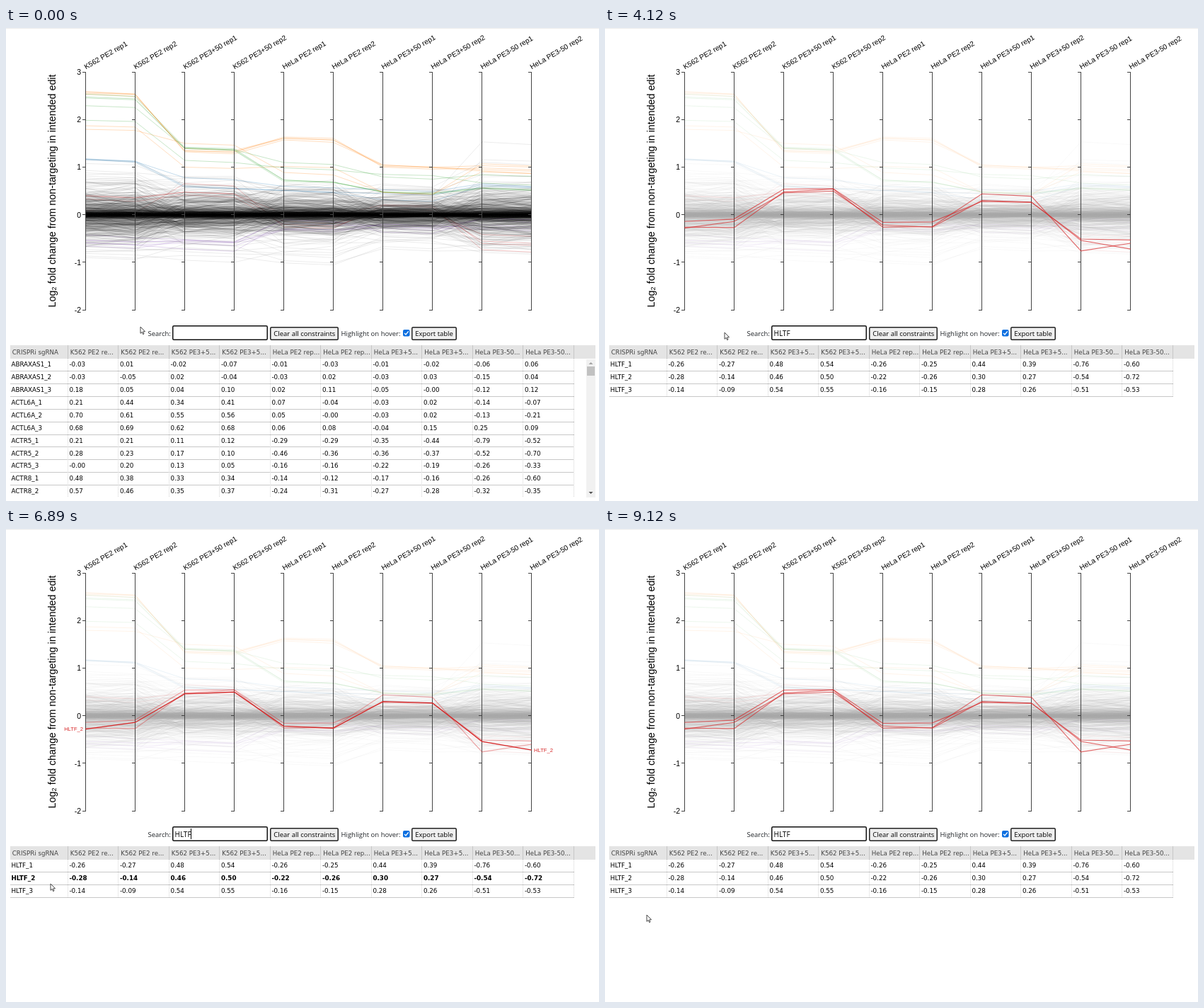
An HTML page with a canvas that plays this animation: 838x668 px, repeating every 9.26 s.

```html
<!DOCTYPE html>
<html lang="en">
<head>
<meta charset="utf-8">
<title>Parallel coordinates search</title>
<style>
html, body { margin: 0; width: 100%; height: 100%; overflow: hidden; background: #fff; }
canvas { display: block; }
</style>
</head>
<body>
<canvas id="stage" width="838" height="668"></canvas>
<script>
const W = 838, H = 668, LOOP = 9260;
const ctx = document.getElementById('stage').getContext('2d');
const SANS = '"Liberation Sans", Arial, sans-serif';
const UI = '"Open Sans", "Noto Sans", sans-serif';
const GRID = '"DejaVu Sans", Verdana, sans-serif';

const axisNames = ['K562 PE2', 'K562 PE3+50', 'HeLa PE2', 'HeLa PE3+50', 'HeLa PE3-50']
  .flatMap(name => [name + ' rep1', name + ' rep2']);
const headers = ['CRISPRi sgRNA', ...axisNames.map(name =>
  name.slice(0, name.startsWith('HeLa') ? (name.includes('+') ? 10 : 12) : (name.includes('+') ? 10 : 11))
    .replace(/(HeLa PE3-50).*/, '$1') + '...')];

// The words shown in the two states of the table.
const parseRows = block => block.trim().split('\n').map(line => line.trim().split(/\s+/));
const allRows = parseRows(`
  ABRAXAS1_1 -0.03 0.01 -0.02 -0.07 -0.01 -0.03 -0.01 -0.02 -0.06 0.06
  ABRAXAS1_2 -0.03 -0.05 0.02 -0.04 -0.03 0.02 -0.03 0.03 -0.15 0.04
  ABRAXAS1_3 0.18 0.05 0.04 0.10 0.02 0.11 -0.05 -0.00 -0.12 0.12
  ACTL6A_1 0.21 0.44 0.34 0.41 0.07 -0.04 -0.03 0.02 -0.14 -0.07
  ACTL6A_2 0.70 0.61 0.55 0.56 0.05 -0.00 -0.03 0.02 -0.13 -0.21
  ACTL6A_3 0.68 0.69 0.62 0.68 0.06 0.08 -0.04 0.15 0.25 0.09
  ACTR5_1 0.21 0.21 0.11 0.12 -0.29 -0.29 -0.35 -0.44 -0.79 -0.52
  ACTR5_2 0.28 0.23 0.17 0.10 -0.46 -0.36 -0.36 -0.37 -0.52 -0.70
  ACTR5_3 -0.00 0.20 0.13 0.05 -0.16 -0.16 -0.22 -0.19 -0.26 -0.33
  ACTR8_1 0.48 0.38 0.33 0.34 -0.14 -0.12 -0.17 -0.16 -0.26 -0.60
  ACTR8_2 0.57 0.46 0.35 0.37 -0.24 -0.31 -0.27 -0.28 -0.32 -0.35`);
const foundRows = parseRows(`
  HLTF_1 -0.26 -0.27 0.48 0.54 -0.26 -0.25 0.44 0.39 -0.76 -0.60
  HLTF_2 -0.28 -0.14 0.46 0.50 -0.22 -0.26 0.30 0.27 -0.54 -0.72
  HLTF_3 -0.14 -0.09 0.54 0.55 -0.16 -0.15 0.28 0.26 -0.51 -0.53`);

let seed = 20417;
const rand = () => {
  seed = (Math.imul(seed, 1664525) + 1013904223) >>> 0;
  return (seed + .5) / 4294967296;
};
const gauss = () => Math.sqrt(-2 * Math.log(rand())) * Math.cos(2 * Math.PI * rand());

const BLACK = '#000', RED = '#d62728';
const lines = [];

// Outlying lines: one key level per condition, both replicates scattered around it.
function addGroup(color, count, jitter, ...levels) {
  for (let i = 0; i < count; i++) {
    const values = levels.flatMap(level => {
      const v = level + jitter * gauss();
      return [v + .02, v - .02 + .01 * gauss()];
    });
    lines.push({ color, values });
  }
}
addGroup('#ff7f0e', 4, .04, 2.54, 1.33, 1.57, .98, .95);
addGroup('#ff7f0e', 2, .2, 2, 1.1, 1.13, .72, .85);
addGroup('#2ca02c', 3, .03, 2.46, 1.38, .7, .42, .58);
addGroup('#2ca02c', 2, .15, 2.1, 1.33, 1.1, .75, .8);
addGroup('#1f77b4', 3, .07, 1.16, .68, .52, .38, .6);
addGroup('#9467bd', 6, .09, -.6, -.6, -.25, -.2, -.2);
addGroup(RED, 4, .14, .25, .5, -.15, .2, -.6);
addGroup(BLACK, 3, .15, 1.1, .5, .4, .38, 1.2);
addGroup(BLACK, 5, .1, -.85, -.82, -.88, -.6, -.75);

// The bulk: a quarter are near-zero controls, the rest vary widely in effect size.
const spread = [.31, .24, .22, .165, .26];
for (let i = 0; i < 850; i++) {
  const size = rand() < .25 ? .12 : 1.5 * rand() ** 1.3;
  const shared = gauss();
  const values = spread.flatMap(s => {
    const base = .6 * shared + .8 * gauss();
    return [0, 1].map(() => {
      const v = s * size * (base + .3 * gauss());
      return .95 * Math.tanh((v > 0 ? 1.15 * v : v) / .95);
    });
  });
  lines.push({ color: BLACK, values });
}

const axisX = i => 112.4 + 70.03 * i;
const valueY = v => 263.8 - 67.1 * v;

function polyline(c, values, color, alpha, width) {
  c.strokeStyle = color;
  c.globalAlpha = alpha;
  c.lineWidth = width;
  c.beginPath();
  values.forEach((v, i) => c.lineTo(axisX(i), valueY(v)));
  c.stroke();
  c.globalAlpha = 1;
}

function makeLayer(gray, grayAlpha, colorAlpha) {
  const layer = document.createElement('canvas');
  layer.width = W;
  layer.height = H;
  const c = layer.getContext('2d');
  for (const { color, values } of lines)
    color === BLACK ? polyline(c, values, gray, grayAlpha, .8)
                    : polyline(c, values, color, colorAlpha, .8);
  return layer;
}
const fullLayer = makeLayer(BLACK, .1, .33);
const paleLayer = makeLayer('#d6d6d6', .27, .1);

function text(str, x, y, font, color = BLACK, align = 'left') {
  ctx.font = font;
  ctx.fillStyle = color;
  ctx.textAlign = align;
  ctx.fillText(str, x, y);
}
function rotatedText(str, x, y, degrees, font, align) {
  ctx.save();
  ctx.translate(x, y);
  ctx.rotate(degrees * Math.PI / 180);
  text(str, 0, 0, font, BLACK, align);
  ctx.restore();
}
function rect(x, y, w, h, fill) {
  ctx.fillStyle = fill;
  ctx.fillRect(x, y, w, h);
}
function shape(points, fill) {
  ctx.beginPath();
  points.forEach(([x, y]) => ctx.lineTo(x, y));
  ctx.closePath();
  ctx.fillStyle = fill;
  ctx.fill();
}

function drawAxes() {
  axisNames.forEach((name, i) => {
    const x = Math.floor(axisX(i));
    rect(x, 62, 1, 336, '#444');
    for (let v = -2; v <= 3; v++) rect(x - 4, Math.round(valueY(v) - .5), 5, 1, '#444');
    rotatedText(name, x + 1, 58.5, -30, '10.1px ' + SANS);
  });
  for (let v = -2; v <= 3; v++) text(v, 106, valueY(v) + 3.7, '10.5px ' + SANS, BLACK, 'right');
  rotatedText('Log₂ fold change from non-targeting in intended edit', 70, 230, -90, '14.3px ' + SANS, 'center');
}

function box(x, y, w, h, fill, border) {
  ctx.beginPath();
  ctx.roundRect(x + .75, y + .75, w - 1.5, h - 1.5, 1.5);
  ctx.fillStyle = fill;
  ctx.fill();
  ctx.strokeStyle = border;
  ctx.lineWidth = 1.5;
  ctx.stroke();
}

function drawControls(typed, caretOn) {
  const font = '9.5px ' + UI, ink = '#212529';
  text('Search:', 200.5, 435, font, ink);
  box(235, 420, 135, 21, '#fff', '#111');
  text(typed, 238.5, 435, '10px ' + UI);
  if (caretOn) rect(Math.round(238 + ctx.measureText(typed).width), 423, 1, 15, BLACK);
  box(373, 422, 97, 19, '#efefef', '#222');
  text('Clear all constraints', 421.8, 435, font, BLACK, 'center');
  text('Highlight on hover:', 473.5, 435, font, ink);
  ctx.beginPath();
  ctx.roundRect(561, 426, 9.5, 9.5, 2);
  ctx.fillStyle = '#0b6fe0';
  ctx.fill();
  ctx.strokeStyle = '#fff';
  ctx.lineWidth = 1.3;
  ctx.beginPath();
  ctx.moveTo(563, 431);
  ctx.lineTo(565, 433);
  ctx.lineTo(568.7, 428.3);
  ctx.stroke();
  box(573, 422, 64, 19, '#efefef', '#222');
  text('Export table', 605, 435, font, BLACK, 'center');
}

const ROW = 17.9;
const columnX = i => i ? 88 + 71.5 * (i - 1) : 6;

function drawTable(rows, hovered) {
  rect(6, 448, 827, 19, '#e4e4e4');
  headers.forEach((name, i) => {
    text(name, columnX(i) + 2.8, 461, '8.7px ' + GRID, '#444');
    rect(Math.floor(columnX(i + 1)) - 1, 448, 1, 19, '#c6c6c6');
  });
  rows.forEach((row, r) => {
    const weight = r === hovered ? 'bold ' : '';
    row.forEach((cell, i) =>
      text(cell, columnX(i) + 1.4, 478.2 + ROW * r, weight + '8.75px ' + GRID));
    const bottom = Math.round(484 + ROW * r);
    if (bottom < 660) rect(6, bottom, 797, 1, '#c8c8c8');
  });
  ctx.strokeStyle = '#d4d4d4';
  ctx.lineWidth = 1;
  ctx.setLineDash([1, 1]);
  for (let i = 1; i <= 11; i++) {
    const x = Math.floor(columnX(i)) - .5;
    ctx.beginPath();
    ctx.moveTo(x, 467);
    ctx.lineTo(x, Math.min(663, 484 + ROW * (rows.length - 1)));
    ctx.stroke();
  }
  ctx.setLineDash([]);
}

function drawScrollbar() {
  rect(820, 468, 13, 195, '#f1f1f1');
  rect(821, 478, 11, 13, '#c1c1c1');
  shape([[823.5, 475], [829.5, 475], [826.5, 472]], '#a3a3a3');
  shape([[823.5, 655], [829.5, 655], [826.5, 658]], '#505050');
}

// Pointer strokes: start, end, number of steps, destination.
const moves = [
  [4120, 4800, 11, 68, 469],
  [4870, 5000, 3, 67, 473],
  [5530, 6040, 8, 64, 489],
  [6610, 7180, 9, 62, 506],
  [8230, 8920, 9, 59, 545]
];
function pointerAt(t) {
  let x = 190, y = 422;
  for (const [start, end, steps, toX, toY] of moves) {
    if (t < start) break;
    const step = Math.floor((t - start) / (end - start) * (steps - 1) + .01) + 1;
    const eased = 1 - (1 - Math.min(1, step / steps)) ** 2;
    x += (toX - x) * eased;
    y += (toY - y) * eased;
  }
  return [Math.round(x), Math.round(y)];
}
function drawPointer(x, y) {
  shape([[0, 0], [0, 9.3], [2.1, 7.4], [3.6, 10.6], [5, 10], [3.6, 6.9], [6.5, 6.7]]
    .map(([dx, dy]) => [x + dx, y + dy]), '#fff');
  ctx.strokeStyle = '#333';
  ctx.lineWidth = .9;
  ctx.stroke();
}

const keyTimes = [1180, 1640, 1840, 2130];
const BLINK = 535;
const typedAt = t => 'HLTF'.slice(0, keyTimes.filter(time => time <= t).length);
// The caret stays lit while keys are pressed and blinks otherwise.
function caretVisible(t) {
  const blinkStart = t < keyTimes[0] ? 250 : Math.min(t, 2125);
  return Math.floor((t - blinkStart) / BLINK) % 2 === 0;
}

function drawHighlights(t, hovered) {
  const fade = Math.min(1, Math.max(0, (t - 4660) / 300));
  const restAlpha = hovered < 0 ? .68 : .62 - .22 * fade;
  const values = foundRows.map(row => row.slice(1).map(Number));
  values.forEach((v, i) => { if (i !== hovered) polyline(ctx, v, RED, restAlpha, 1.1); });
  if (hovered < 0) return;
  const active = values[hovered], name = foundRows[hovered][0], font = '7.6px ' + SANS;
  polyline(ctx, active, RED, 1, 1.3);
  text(name, 109, valueY(active[0]) + 2.6, font, RED, 'right');
  text(name, 746, valueY(active[9]) + 2.6, font, RED);
}

function draw(t) {
  const filtered = t >= 2840;
  const [px, py] = pointerAt(t);
  const row = Math.floor((py - 466.5) / ROW);
  const hovered = filtered && row >= 0 && row < foundRows.length ? row : -1;

  rect(0, 0, W, H, '#fff');
  rect(0, 0, W, 1, '#ececec');
  if (!filtered) ctx.drawImage(fullLayer, 0, 0);
  else if (t < 2910) ctx.drawImage(paleLayer, 0, 0);
  else {
    ctx.globalAlpha = .34;
    ctx.drawImage(fullLayer, 0, 0);
    ctx.globalAlpha = 1;
  }
  drawAxes();
  if (filtered) drawHighlights(t, hovered);
  drawControls(typedAt(t), caretVisible(t));
  drawTable(filtered ? foundRows : allRows, hovered);
  if (!filtered) drawScrollbar();
  drawPointer(px, py);
}

const begin = performance.now();
function tick() {
  draw((performance.now() - begin) % LOOP);
  requestAnimationFrame(tick);
}
tick();
</script>
</body>
</html>
```
